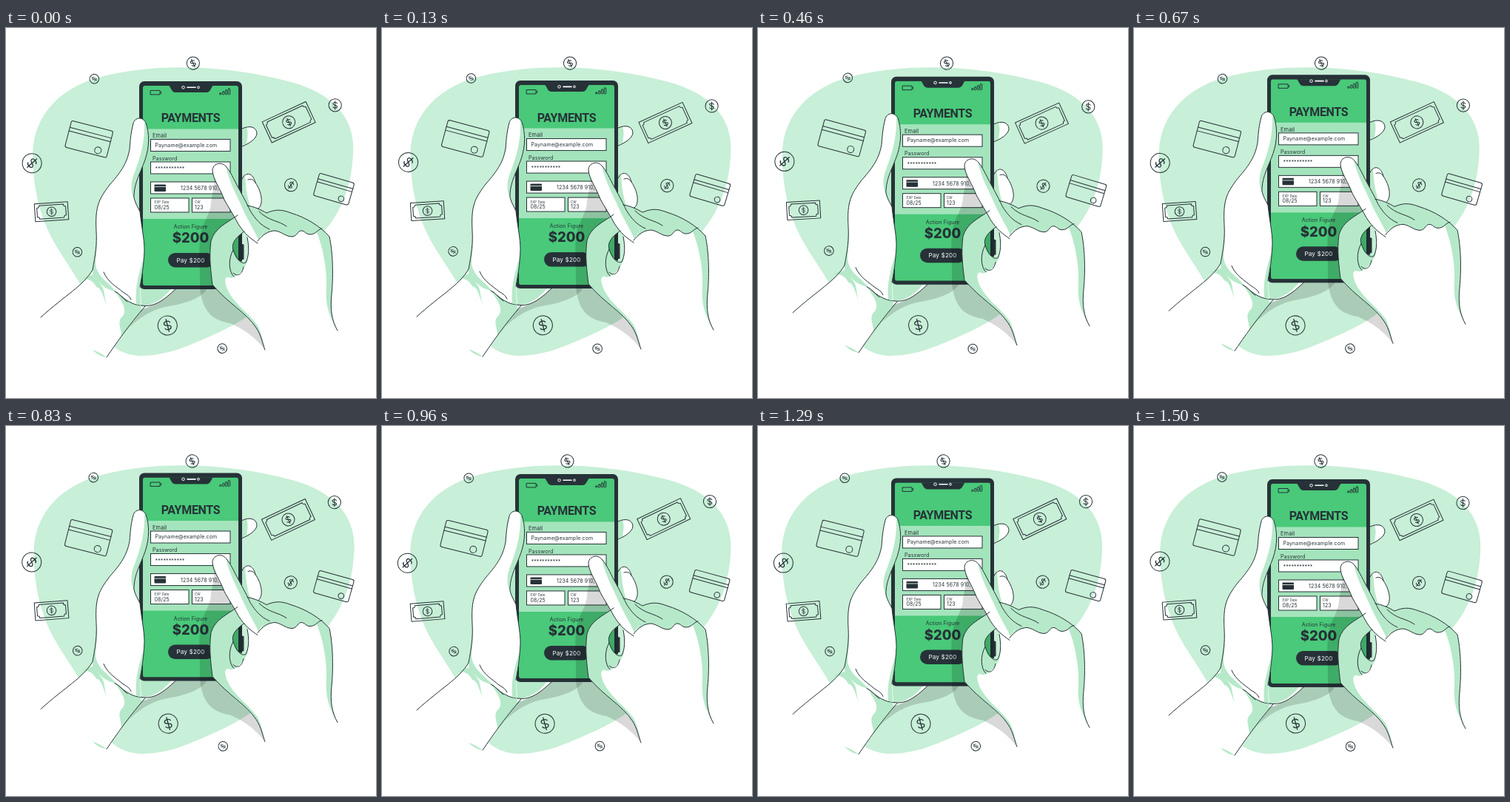
These frames come from a looping animation (500 by 500 pixels, 1.54 s). An HTML page:

```html
<!DOCTYPE html>
<html lang="en">
<head>
<meta charset="utf-8">
<title>Payments</title>
<style>
  html, body { margin: 0; width: 100%; height: 100%; overflow: hidden; background: #fff; }
  svg { display: block; width: 100vw; height: 100vh; }
  .line { fill: none; stroke: #263238; stroke-width: 1; stroke-linecap: round; stroke-linejoin: round; }
  .box { fill: #fff; stroke: #263238; }
  .dark { fill: #263238; }
  .green { fill: #49c979; }
  .mid { fill: #a4e4bc; }
  .soft { fill: #b6e9c9; }
  .pale { fill: #c8efd7; }
  .white { fill: #fff; }
  .shade { fill: #000; opacity: .15; }
  text { font-family: Inter, "Open Sans", sans-serif; fill: #263238; font-size: 7px; letter-spacing: .12px; }
  #title { font-weight: 700; font-stretch: 62.5%; font-size: 23px; letter-spacing: -.3px; text-anchor: middle; }
  .tiny { font-size: 4.4px; }
  .mid-text { text-anchor: middle; }
  .price { font-size: 18.5px; font-weight: 800; letter-spacing: 0; }
  .pay { font-size: 8.2px; fill: #fff; }
</style>
</head>
<body>
<svg viewBox="0 0 500 500">
  <defs><clipPath id="screen"><rect x="185" y="78" width="129" height="270" rx="3"/></clipPath></defs>

  <path id="blob" class="pale" d="M36 165C39 118 72 77 140 63C215 46 310 52 385 73C440 88 469 120 469 162C468 225 445 265 405 300C380 325 365 350 345 374C325 394 295 408 270 419C240 432 215 443 180 443C150 441 130 425 115 385C105 345 85 325 65 290C42 250 35 205 36 165Z"/>
  <g id="floats" class="line"></g>

  <g id="scene">
    <!-- cast shadows -->
    <path class="shade" d="M183 380L228 352H272C264 366 240 373 215 377C192 382 174 396 156 415Z"/>
    <path class="shade" d="M262 352H283C305 375 333 394 340 408C345 416 348 428 350 435C338 419 322 407 303 399C280 395 266 385 262 352Z"/>

    <!-- fingers behind the phone -->
    <path class="white" d="M315 137C330 131 339 134 339 143C338 150 328 156 315 161Z"/>
    <path class="soft" d="M315 137L325 134C328 142 326 150 325 156L315 161Z"/>
    <path class="line" d="M319 136C330 131 339 134 339 143C338 150 329 156 319 160"/>
    <path class="white" d="M315 204C324 192 334 196 337 209C346 222 348 238 341 244C334 245 328 241 315 232Z"/>
    <path class="soft" d="M315 200L322 197C325 204 322 215 330 241L315 232Z"/>
    <path class="line" d="M319 204C324 193 334 196 337 209C346 222 348 238 341 244C335 245 330 243 326 240M327 205C332 203 335 206 337 209"/>

    <!-- left sleeve and heel of the hand -->
    <path class="white" d="M118 326C108 346 80 361 47 391L80 425L136 445C150 426 165 405 183 380C203 375 217 365 229 352H181L150 340Z"/>
    <path class="soft" d="M101 339C112 338 118 342 122 350C129 351 131 362 136 375C132 360 134 354 128 347L118 333Z"/>
    <path class="soft" d="M146 354C158 366 168 371 183 376L182 384C170 400 164 408 156 417C156 405 149 397 158 389C164 380 157 370 146 354Z"/>
    <path class="soft" d="M117 435C124 437 129 440 136 445C128 444 122 440 117 435Z"/>
    <path class="soft" d="M181 345H229C214 366 201 374 183 376Z"/>
    <path class="soft" d="M188 180L172 225L181 249Z"/>
    <path class="line" d="M117 327C104 349 80 361 47 391M136 445C149 426 165 403 188 376M229 353C213 368 200 378 183 375C170 374 162 368 150 357"/>

    <!-- phone -->
    <rect class="dark" x="180" y="72" width="139" height="281" rx="7"/>
    <rect class="dark" x="318" y="292" width="3.5" height="21" rx="1.5"/>
    <g clip-path="url(#screen)">
      <rect class="green" x="185" y="78" width="129" height="270"/>
      <rect class="mid" x="185" y="136.500" width="129" height="121.500"/>
      <path class="dark" d="M219 77C223 79 223 87 229 87H271C277 87 277 79 281 77Z"/>
    </g>
    <g fill="none" stroke="#fff">
      <circle cx="239.5" cy="80.3" r="1.8"/><circle cx="260" cy="80.3" r="1.4"/>
      <path d="M245 80.3H256" stroke-width="1.6" stroke-linecap="round"/>
    </g>
    <path class="line" d="M195.500 84.500H208V90H195.500ZM209.500 86V88.500"/>
    <g id="bars" class="line"></g>

    <text id="title" x="249.500" y="127.500">PAYMENTS</text>
    <text x="198" y="148.300" style="font-size:7.400px">Email</text>
    <text x="198" y="178.800">Password</text>
    <g class="box">
      <rect x="195.500" y="150.500" width="107.500" height="16"/>
      <rect x="195.500" y="181" width="107.500" height="16"/>
      <rect x="195.500" y="208" width="107.500" height="16"/>
      <rect x="195.500" y="230" width="51.500" height="19"/>
      <rect x="251.500" y="230" width="51.500" height="19"/>
    </g>
    <text x="201.500" y="160.800">Payname@example.com</text>
    <text x="201.500" y="193">***********</text>
    <rect class="dark" x="200.500" y="211.500" width="15.500" height="9.500" rx="1"/>
    <path d="M200.500 214.500H216" stroke="#fff" stroke-width=".8"/>
    <text x="236" y="219">1234 5678 910,</text>
    <text class="tiny" x="200.500" y="237.500">EXP Date</text>
    <text x="200.500" y="245">08/25</text>
    <text class="tiny" x="255" y="237.500">CW</text>
    <text x="255" y="245">123</text>
    <text class="mid-text" x="249.500" y="271">Action Figure</text>
    <text class="price mid-text" x="249.500" y="290.300">$200</text>
    <rect class="dark" x="219" y="304" width="62" height="19.500" rx="9.700"/>
    <text class="pay mid-text" x="249.500" y="316.600">Pay $200</text>
    <path class="shade" d="M279 195C284 206 280 218 277 235C277 252 264 264 262 285C260 310 263 328 262 353H319V240L295 200Z"/>

    <!-- left hand -->
    <path class="white" d="M117 327C121 306 123 292 122 275C120 240 126 231 140 212C158 192 164 180 167 164C168 150 169 140 172 129C174 121 184 119 189 128C194 143 194 160 188 178C182 195 174 208 173 225C172 232 177 240 181 248C183 268 187 285 187 300C186 325 183 338 181 352L180 374C168 372 158 364 150 357L133 348Z"/>
    <path class="soft" d="M187 127C188 150 183 172 172 200C167 215 169 230 181 243C177 237 173 231 173 225C174 208 182 195 188 178C194 160 194 143 189 128Z"/>
    <path class="soft" d="M186 310C181 330 174 346 176 373L182 375L181 352C183 338 186 325 186 310Z"/>
    <path class="soft" d="M122 278C125 296 119 312 122 324C126 336 134 341 143 350L150 357C139 354 128 350 117 332C119 312 123 298 122 278Z"/>
    <path class="line" d="M117 327C121 306 123 292 122 275C120 240 126 231 140 212C158 192 164 180 167 164C168 150 169 140 172 129C174 121 184 119 189 128C194 143 194 160 188 178C182 195 174 208 173 225C172 232 177 240 181 248C183 268 187 285 187 300C186 325 183 338 181 350"/>
    <path class="line" d="M132 330C137 343 150 350 158 357C163 360 167 362 169 367M147 356C154 359 158 366 164 370"/>

    <!-- right hand: palm, back, finger -->
    <path class="soft" d="M313 253C298 264 282 270 277 288C274 310 277 330 279 347C300 372 325 385 338 405C345 415 347 428 350 435L346 405L310 350L327 312C318 320 310 314 307 300C304 290 312 282 322 275Z"/>
    <path class="soft" d="M326 240C335 241 345 246 352 250C362 246 370 244 385 250C405 256 425 268 437 282C441 300 443 330 440 360C438 380 440 395 448 409L420 380L340 290Z"/>
    <path class="white" d="M326 282L340 288C346 280 354 274 364 274C374 276 378 282 387 282C394 281 394 274 399 274C404 274 405 279 411 279C415 279 417 276 420 276C428 296 434 325 433 350C431 372 436 390 448 409L440 430L352 445L350 435C347 420 344 410 340 402C328 385 309 374 299 353C294 340 296 334 304 338C314 336 326 322 327 312C328 300 328 290 326 282Z"/>
    <path class="white" d="M279 193C279 183 291 180 297 187C303 193 308 205 314 216C321 229 326 238 330 247C337 258 343 266 348 275L340 291C330 284 323 279 314 265C306 250 299 240 295 232C288 214 280 205 279 193Z"/>
    <path class="soft" d="M297 187C303 193 308 205 314 216C321 229 326 238 330 247C337 258 343 266 348 275L341 286C336 274 328 262 322 249C314 230 302 210 297 187Z"/>
    <path class="line" d="M340 291C330 284 323 279 314 265C306 250 299 240 295 232C288 214 280 205 279 193C279 183 291 180 297 187C303 193 308 205 314 216C321 229 326 238 330 247C337 258 343 266 356 272"/>
    <path class="line" d="M326 240C335 241 345 246 352 250C362 246 370 244 385 250C405 256 425 268 437 282C441 300 443 330 440 360C438 380 440 395 448 409M342 248C355 261 368 260 379 268"/>
    <path class="line" d="M340 288C346 280 354 274 364 274C374 276 378 282 387 282C394 281 394 274 399 274C404 274 405 279 411 279C419 279 421 272 427 271M313 253C298 264 282 270 277 288C274 310 277 330 279 347C300 372 325 385 338 405C345 415 347 428 350 435"/>
    <path class="line" d="M322 275C312 282 304 290 307 300C300 312 301 330 308 336M326 283C329 298 328 309 324 317C318 320 311 312 307 300M307 331C313 337 319 333 321 323"/>
  </g>
</svg>
<script>
const LOOP = 1540, LEAD = 35;
const $ = id => document.getElementById(id);

const place = (x, y, turn, body) => `<g transform="translate(${x} ${y}) rotate(${turn})">${body}</g>`;
const ring = r => `<circle r="${r}"/>`;
const rect = (w, h, r = 0) => `<rect x="${-w / 2}" y="${-h / 2}" width="${w}" height="${h}" rx="${r}"/>`;

function dollar(r) {
  const k = r / 10;
  return `<path transform="scale(${k})" stroke-width="${(r > 10 ? 1.3 : r > 7 ? 1 : 0.75) / k}"
    d="M3.200-2.600C2.500-5-3.200-5-3.200-2.200C-3.200.6 3.200-.6 3.200 2.200C3.200 5-2.500 5-3.200 2.600M0-6.500V6.500"/>`;
}

const coin = (x, y, r, turn) => place(x, y, turn, ring(r) + dollar(r));

function note(x, y, w, h, turn, r) {
  const a = w / 2 - 3, b = h / 2 - 3, c = 3;
  const inner = `M${c - a} ${-b}H${a - c}Q${a - c} ${c - b} ${a} ${c - b}V${b - c}Q${a - c} ${b - c} ${a - c} ${b}` +
    `H${c - a}Q${c - a} ${b - c} ${-a} ${b - c}V${c - b}Q${c - a} ${c - b} ${c - a} ${-b}Z`;
  return place(x, y, turn, rect(w, h) + `<path d="${inner}"/>` + ring(r) + dollar(r));
}

function card(x, y, w, turn) {
  const k = w / 58, a = w / 2;
  return place(x, y, turn, rect(w, 37 * k, 2.5) +
    `<path d="M${-a} ${-9 * k}H${a}M${-a} ${-4 * k}H${a}"/><circle cx="${15.5 * k}" cy="${11.5 * k}" r="${4.5 * k}"/>`);
}

$('floats').innerHTML =
  coin(252.5, 47.5, 8.6, -25) + coin(119, 69, 6.3, -55) + coin(35, 183, 13, 48) +
  coin(444.5, 104, 8.6, 0) + coin(385, 212, 8.6, 35) + coin(96.5, 303, 6.3, -55) +
  coin(218.5, 402, 13, -15) + coin(292.5, 433, 6.3, -55) +
  note(382, 127, 65, 31, -25, 8.5) + note(61.5, 248.5, 45, 24, -4, 6.3) +
  card(112, 150.5, 58, 14.5) + card(443, 217.5, 49, 16);

$('bars').innerHTML = [2, 4, 6, 8].map((h, i) =>
  `<rect x="${288.5 + i * 3.9}" y="${90 - h}" width="2.500" height="${h}" rx="1"/>`).join('');

// choose the narrowest heading face, then a type size that suits it
const title = $('title');
const widthIn = face => {
  title.style.fontFamily = `"${face}", sans-serif`;
  return title.getComputedTextLength();
};
const faces = ['Open Sans', 'Roboto', 'Noto Sans', 'Lato', 'Liberation Sans'];
const face = faces.reduce((a, b) => widthIn(b) < widthIn(a) ? b : a);
const size = 23 * 75 / widthIn(face);
title.style.fontSize = Math.max(16, Math.min(23.5, size)) + 'px';

function draw(ms) {
  const p = ((ms + LEAD) / LOOP) % 1, a = p * 2 * Math.PI;
  const swing = Math.asin(Math.sin(a)) * 2 / Math.PI;
  const slide = 3.2 * Math.sin(2 * a) - 0.6;
  const lift = 4.4 * (Math.cos(a) - 1);
  $('blob').setAttribute('transform', `translate(${slide.toFixed(3)} 0)`);
  $('floats').setAttribute('transform', `rotate(${swing.toFixed(4)} 250 250)`);
  $('scene').setAttribute('transform', `translate(0 ${lift.toFixed(3)})`);
}

const start = performance.now();
function tick() {
  draw((performance.now() - start) % LOOP);
  requestAnimationFrame(tick);
}
tick();
</script>
</body>
</html>
```
